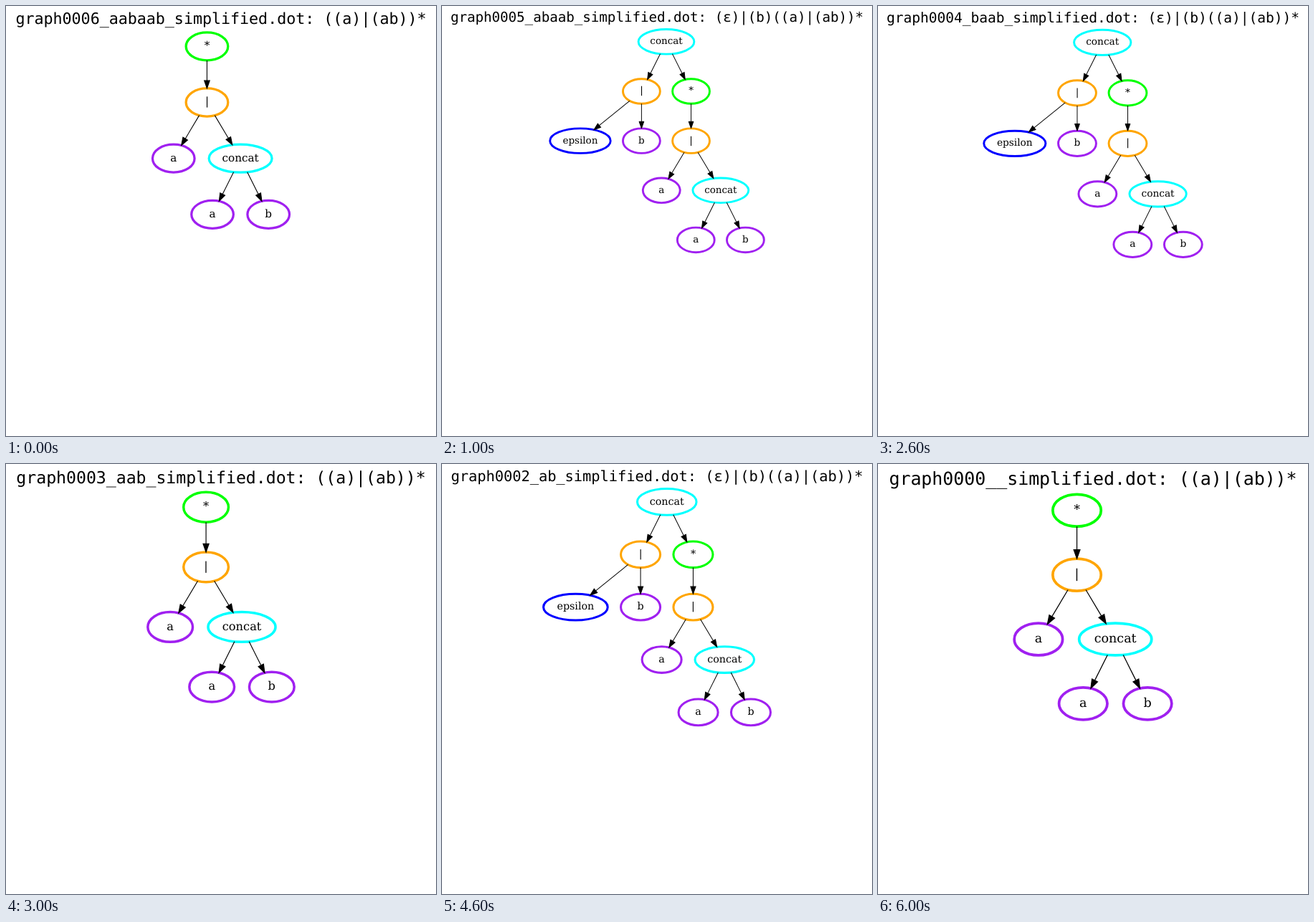
Animation, 600 px wide and 600 px high, one loop 7 s. Source, as an HTML page:

```html
<!DOCTYPE html>
<html lang="en">
<head>
<meta charset="utf-8">
<style>
  html, body { margin: 0; height: 100%; overflow: hidden; background: #fff; }
  svg { display: block; width: 600px; height: 600px; }
  text { text-anchor: middle; text-rendering: geometricPrecision; }
  .title { font: 20px "DejaVu Sans Mono", monospace; letter-spacing: -0.041px; }
  .label { font: 14px "DejaVu Serif", serif; }
  ellipse { fill: none; stroke-width: 3; }
  .edge { stroke: #000; }
</style>
</head>
<body>
<svg viewBox="0 0 600 600"></svg>
<script>
const STEP = 1000, TOP = 51.9, RANK = 72, RY = 18;
const COLORS = { '*': '#0f0', '|': '#ffa500', concat: '#0ff', epsilon: '#00f', a: '#a020f0', b: '#a020f0' };
const WIDTHS = { concat: 40.5, epsilon: 44 };

const node = (label, x, ...children) => ({ label, x, children, rx: WIDTHS[label] || 27 });

// Tree for ((a)|(ab))*
const star = x =>
  node('*', x,
    node('|', x,
      node('a', x - 43),
      node('concat', x + 43, node('a', x + 7), node('b', x + 79))));

const shortTree = star(-18);
const longTree =
  node('concat', 13.5,
    node('|', -22.5, node('epsilon', -111.5), node('b', -22.5)),
    star(49.5));

const words = ['aabaab', 'abaab', 'baab', 'aab', 'ab', 'b', ''];
const slides = words.map((word, i) => {
  const isShort = i % 3 === 0;
  const regex = (isShort ? '' : '(ε)|(b)') + '((a)|(ab))*';
  return {
    title: `graph000${6 - i}_${word}_simplified.dot: ${regex}`,
    tree: isShort ? shortTree : longTree
  };
});

// Straight edge clipped to both ellipses, ending in an arrowhead
function drawEdge(from, to, y) {
  const dx = to.x - from.x, length = Math.hypot(dx, RANK);
  const clip = rx => length / Math.hypot(dx / rx, RANK / RY);
  const end = length - clip(to.rx);
  const angle = Math.atan2(RANK, dx) * 180 / Math.PI;
  return `<g class="edge" transform="translate(${from.x} ${y}) rotate(${angle})">
    <path d="M${clip(from.rx)} 0H${end - 10}"/>
    <path d="M${end} 0l-10 3.5v-7z"/></g>`;
}

function drawTree(n, y = TOP) {
  return `<ellipse cx="${n.x}" cy="${y}" rx="${n.rx}" ry="${RY}" stroke="${COLORS[n.label]}"/>
    <text class="label" x="${n.x}" y="${y + 3.6}">${n.label}</text>` +
    n.children.map(c => drawTree(c, y + RANK) + drawEdge(n, c, y)).join('');
}

function drawSlide({ title, tree }) {
  // The title's width sets the scale of the whole graph
  const scale = 800 / (16 * title.length + 33);
  return `<g transform="translate(300) scale(${scale})">
    <text class="title" y="23.2">${title}</text>${drawTree(tree)}</g>`;
}

const svg = document.querySelector('svg');
const start = performance.now();
let shown = -1;

function tick() {
  const index = Math.floor((performance.now() - start) / STEP) % slides.length;
  if (index !== shown) {
    shown = index;
    svg.innerHTML = drawSlide(slides[index]);
  }
  requestAnimationFrame(tick);
}
tick();
</script>
</body>
</html>
```
